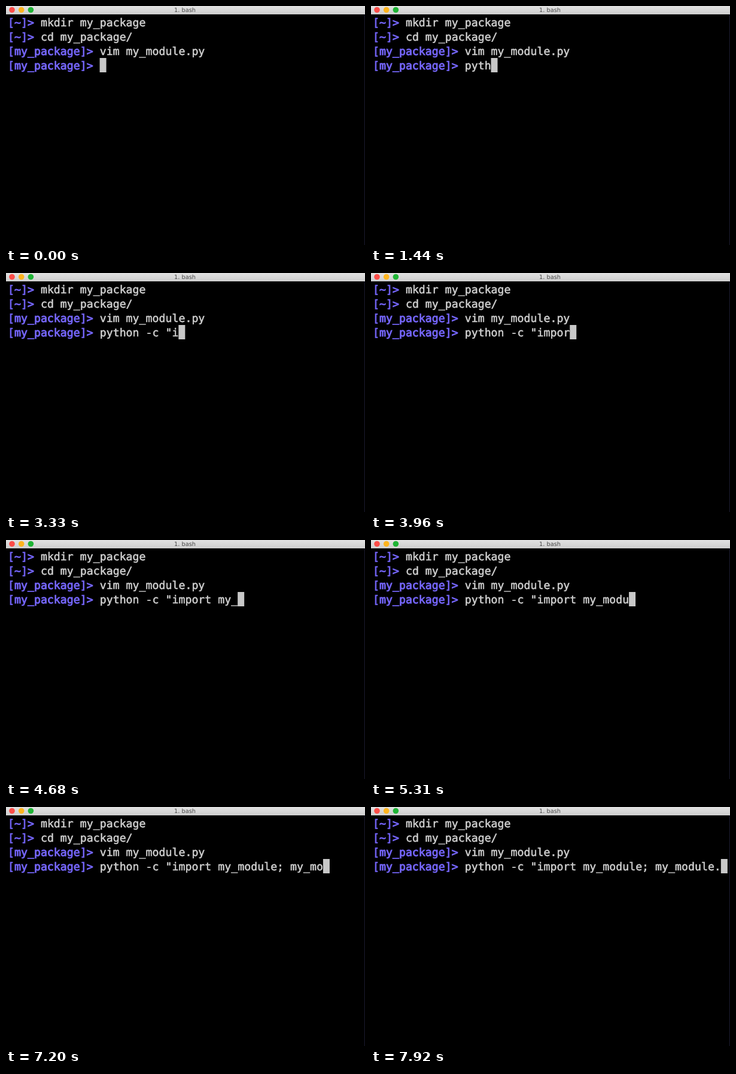
Animation of 600x400 px, one loop 8000 ms. Source, as an HTML page:

```html
<!DOCTYPE html>
<html lang="en">
<head>
<meta charset="utf-8">
<title>Terminal</title>
<style>
  html, body { margin: 0; width: 100%; height: 100%; overflow: hidden; background: #000; }
  svg { display: block; width: 600px; height: 400px; }
  text { white-space: pre; text-rendering: geometricPrecision; }
  .line { font: 18.24px "DejaVu Sans Mono", monospace; fill: #cfcfcf; stroke: #cfcfcf; stroke-width: .55px; }
  .prompt { fill: #7566fb; stroke: #7566fb; stroke-width: .9px; }
  .title { font: 9.8px "DejaVu Sans", sans-serif; fill: #484848; text-anchor: middle; }
</style>
</head>
<body>
<svg viewBox="0 0 600 400">
  <defs>
    <linearGradient id="bar" x2="0" y2="1">
      <stop stop-color="#e2e2e2"/>
      <stop offset="1" stop-color="#cecece"/>
    </linearGradient>
  </defs>
  <rect width="600" height="400"/>
  <path d="M599.5 14V400" stroke="#1c1c30"/>
  <rect width="600" height="14" fill="url(#bar)"/>
  <circle cx="10" cy="6.5" r="4.8" fill="#fb4d48"/>
  <circle cx="25.7" cy="6.5" r="4.8" fill="#fdb41e"/>
  <circle cx="41.4" cy="6.5" r="4.8" fill="#1fb435"/>
  <text class="title" x="299" y="10">1. bash</text>
  <g class="line">
    <text x="3" y="34"><tspan class="prompt">[~]&gt;</tspan> mkdir my_package</text>
    <text x="3" y="58"><tspan class="prompt">[~]&gt;</tspan> cd my_package/</text>
    <text x="3" y="82"><tspan class="prompt">[my_package]&gt;</tspan> vim my_module.py</text>
    <text x="3" y="106"><tspan class="prompt">[my_package]&gt;</tspan> <tspan id="typed"></tspan></text>
  </g>
  <rect id="cursor" y="87" width="11" height="24" fill="#c8c8c8"/>
</svg>
<script>
const LOOP = 8000, STEP = 90;
const CHAR_WIDTH = 10.98, INPUT_X = 156.6;
const command = 'python -c "import my_module; my_module.';
// Typing rhythm: [time in ms, characters typed]
const rhythm = [
  [0, 0], [800, 0], [1440, 4], [2430, 9], [3240, 11], [3960, 16],
  [4050, 16.4], [5310, 25], [6570, 30], [7920, 39], [LOOP, 39]
];
const typed = document.getElementById('typed');
const cursor = document.getElementById('cursor');

function typedCount(time) {
  const next = rhythm.findIndex(([t]) => t > time);
  const [t0, n0] = rhythm[next - 1], [t1, n1] = rhythm[next];
  return Math.round(n0 + (n1 - n0) * (time - t0) / (t1 - t0));
}

function draw(now) {
  const time = Math.floor(now % LOOP / STEP) * STEP;
  const count = typedCount(time);
  typed.textContent = command.slice(0, count);
  cursor.setAttribute('x', INPUT_X + count * CHAR_WIDTH);
}

let start;
function frame(now) {
  start ??= now;
  draw(now - start);
  requestAnimationFrame(frame);
}
draw(0);
requestAnimationFrame(frame);
</script>
</body>
</html>
```
